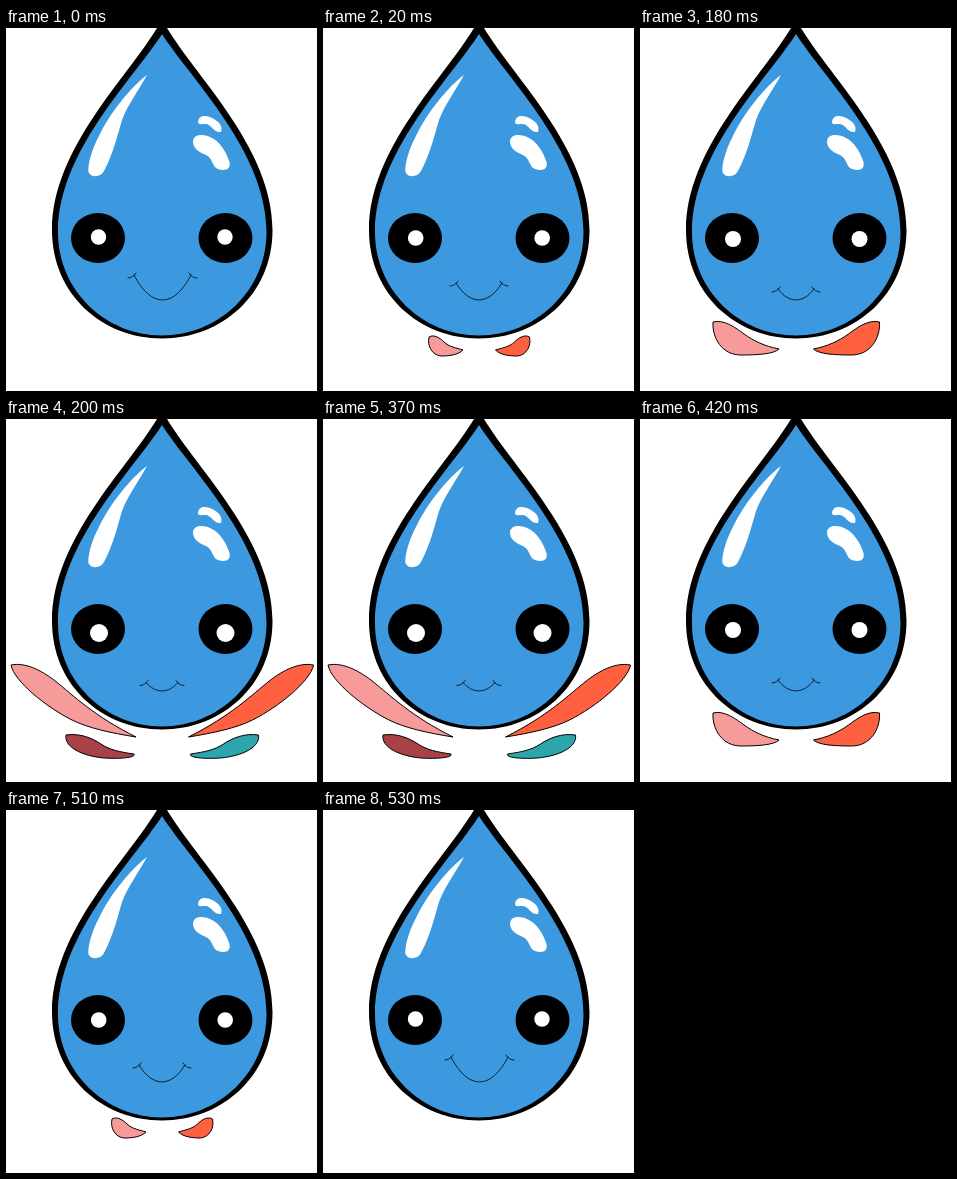
These frames come from a looping animation (311 by 363 pixels, 0.58 s). An HTML page:

```html
<!DOCTYPE html>
<html lang="en">
<head>
<meta charset="utf-8">
<title>Happy water drop</title>
<style>
  html, body { margin: 0; width: 100%; height: 100%; overflow: hidden; background: #fff; }
  svg { display: block; width: 100vw; height: 100vh; }
  .line { fill: none; stroke: #10202c; stroke-width: 1; stroke-linecap: round; }
  .petal { stroke: #000; stroke-width: 1; }
</style>
</head>
<body>
<svg viewBox="0 0 311 363">
  <g id="petals"></g>
  <path d="M151 0C121 50 46 121 46 202C46 267 97 310.5 156 310.5C215 310.5 266.500 267 266.500 202C266.500 121 191 50 161 0Z"/>
  <path fill="#3c99e0" d="M156 6C126.500 52 52 124 52 204C52 263 100 307.500 156 307.500C212 307.500 260.500 263 260.500 204C260.500 124 185.500 52 156 6Z"/>
  <g fill="#fff">
    <path d="M141 47C126 58 104 84 92 110C84 125 81 142 83 145C86 150 95 149 98 143C108 124 112 105 116 92C122 76 133 62 141 47Z"/>
    <path d="M192 94C193 86 201 87 208 91C213 94 217 98 215 104C207 105 206 96 199 96C195 96 192 97 192 94Z"/>
    <path d="M187 113C188 106 197 106 204 109C215 114 220 124 223.500 134C225 142 219 143 212 141C206 139 207 130 200 127C192 124 187 120 187 113Z"/>
  </g>
  <ellipse cx="92" cy="210" rx="27" ry="25"/>
  <ellipse cx="219.500" cy="210" rx="27" ry="25"/>
  <g id="pupils" fill="#fff"><ellipse/><ellipse/></g>
  <path id="mouth" class="line"/>
</svg>
<script>
const LOOP = 580;
const $ = id => document.getElementById(id);

// Left-hand petals; the right side mirrors them.
const bud = 'M106 309C111 306 117 310 121 314C126 319 134 320 140 322C135 327 126 328 118 328C109 327 104 318 106 309Z';
const foot = 'M73 294C84 291 96 300 104 306C114 313 124 318 139 321C134 326 118 327 101 327C82 327 72 310 73 294Z';
const wing = 'M5 246C20 243 36 252 48 261C68 277 88 297 130 318C105 314 82 309 66 301C40 288 8 262 5 246Z';
const leafSmall = 'M60 316C74 314 86 319 95 325C104 331 114 333 128 335C130 339 112 340 98 339C76 337 58 328 60 316Z';
const leafBig = 'M26 306C38 301 54 309 66 316C84 327 100 336 123 340C122 346 96 345 82 343C58 337 26 322 26 306Z';

const colors = [['#f79a9a', '#ff6040'], ['#a94247', '#2ca5ad']];

// mouth: left, right, corner height; eye: x, y, radius
const poses = {
  rest:   { petals: [],                mouth: [128, 185, 247], eye: [92.5, 209, 7.7] },
  sprout: { petals: [bud],             mouth: [133, 179, 255], eye: [92.7, 210, 7.8] },
  feet:   { petals: [foot],            mouth: [138, 174, 261], eye: [93, 211, 8] },
  spread: { petals: [wing, leafSmall], mouth: [140, 172, 263.5], eye: [93, 214, 9] },
  bloom:  { petals: [wing, leafBig],   mouth: [144, 168, 266], eye: [93.2, 220.5, 9] }
};

const steps = [
  [0, 'rest'], [20, 'sprout'], [180, 'feet'], [200, 'spread'], [260, 'bloom'],
  [370, 'spread'], [420, 'feet'], [510, 'sprout'], [530, 'rest']
];

function mouthPath([l, r, y]) {
  const w = r - l, low = y + (272 - y) * 4 / 3;
  return `M${l} ${y}C${l + w * .3} ${low} ${r - w * .3} ${low} ${r} ${y}` +
    `M${l - 6} ${y + 3}Q${l - 1} ${y + 3} ${l + 2} ${y - 2}` +
    `M${r - 2} ${y - 2}Q${r + 1} ${y + 3} ${r + 6} ${y + 3}`;
}

function petalPair(d, i) {
  const [left, right] = colors[i];
  return `<path class="petal" fill="${left}" d="${d}"/>` +
    `<path class="petal" fill="${right}" d="${d}" transform="translate(312.500 0) scale(-1 1)"/>`;
}

let current;
function show(name) {
  if (name === current) return;
  current = name;
  const { petals, mouth, eye: [x, y, r] } = poses[name];
  $('petals').innerHTML = petals.map(petalPair).join('');
  $('mouth').setAttribute('d', mouthPath(mouth));
  [x, x + 126.5].forEach((cx, i) => {
    const p = $('pupils').children[i];
    Object.entries({ cx, cy: y, rx: r, ry: r }).forEach(([k, v]) => p.setAttribute(k, v));
  });
}

const start = performance.now();
function tick() {
  const t = (performance.now() - start) % LOOP;
  show(steps.filter(([at]) => at <= t).pop()[1]);
  requestAnimationFrame(tick);
}
tick();
</script>
</body>
</html>
```
